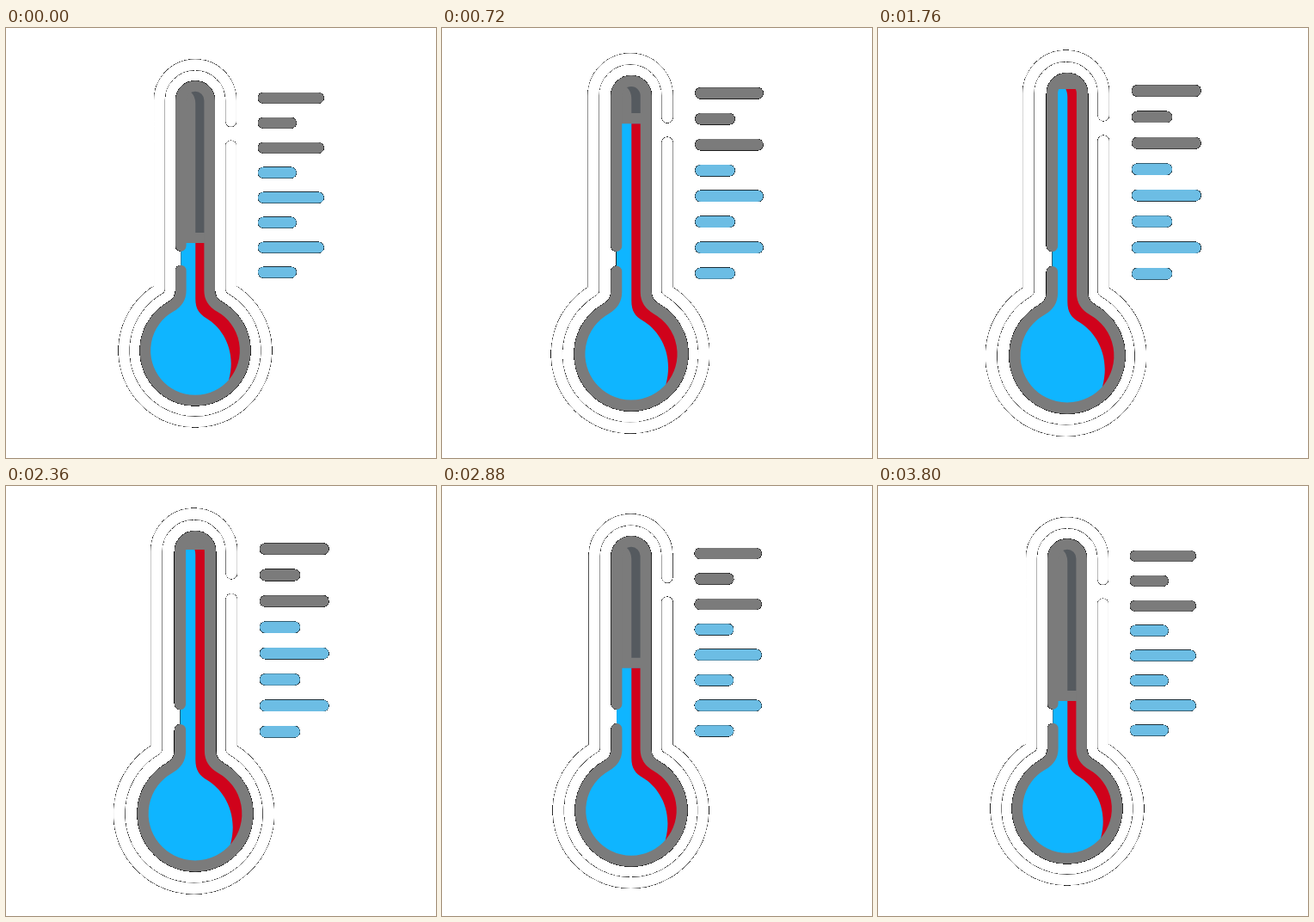
Write an HTML page with a canvas that moves like this. It is 500 px wide and 500 px high and loops after 3880 ms.

```html
<!DOCTYPE html>
<html>
<head>
<meta charset="utf-8">
<style>
  html, body { margin: 0; width: 100%; height: 100%; overflow: hidden; background: #fff; }
  canvas { display: block; width: 500px; height: 500px; }
</style>
</head>
<body>
<canvas id="stage" width="500" height="500"></canvas>
<script>
const ctx = document.getElementById('stage').getContext('2d', { willReadFrequently: true });
const GRAY = '#7b7b7b', SKY = '#6cbde4', BLUE = '#0fb5ff', RED = '#d0021b', SLOT = '#555a5f';
const LOOP = 3880, STEP = 40;
const RISE_END = 1760, FALL_START = 2260, FALL_END = 3800;

const halo = new Path2D('M262.2 131.5V306A87 87 0 1 1 174.82 306V76A43.69 43.69 0 0 1 262.2 76V101.5');
const body = new Path2D('M202.5 283.5V308Q202.5 321 190 328A61 61 0 1 0 250 328' +
  'Q237.5 321 237.5 308V76A17.5 17.5 0 0 0 202.5 76V253.5');
const shade = new Path2D('M215 66.5C218 69 220.3 74 220.3 80V318C220.3 331 225 336.5 234 342' +
  'C252 352.5 271 380 261 417L300 430V50H215Z');

// Cubic bezier (x1, 0, x2, 1)
function ease(t, x1, x2) {
  let lo = 0, hi = 1;
  for (let i = 0; i < 24; i++) {
    const s = (lo + hi) / 2, r = 1 - s;
    if (3 * r * r * s * x1 + 3 * r * s * s * x2 + s * s * s < t) lo = s; else hi = s;
  }
  return lo * lo * (3 - 2 * lo);
}

function progress(time, x1, x2) {
  if (time < RISE_END) return ease(time / RISE_END, x1, x2);
  const t = (time - FALL_START) / (FALL_END - FALL_START);
  return 1 - ease(Math.min(1, Math.max(0, t)), x1, x2);
}

function scaled(scale, cx, draw) {
  ctx.save();
  ctx.translate(cx, 250);
  ctx.scale(scale, scale);
  ctx.translate(-cx, -250);
  draw();
  ctx.restore();
}

function stroke(path, color, width) {
  ctx.strokeStyle = color;
  ctx.lineWidth = width;
  ctx.stroke(path);
}

function fillBand(path, color, top, bottom) {
  if (bottom <= top) return;
  ctx.save();
  ctx.beginPath();
  ctx.rect(0, top, 500, bottom - top);
  ctx.clip();
  ctx.fillStyle = color;
  ctx.fill(path);
  ctx.restore();
}

function drawScale() {
  for (let i = 0; i < 8; i++) {
    ctx.fillStyle = i < 3 ? GRAY : SKY;
    ctx.beginPath();
    ctx.roundRect(295.1, 66.3 + i * 30.4, i % 2 ? 46.9 : 80.4, 13.4, 6.7);
    ctx.fill();
  }
}

function drawTube(level) {
  ctx.fillStyle = GRAY;
  ctx.fill(body);
  ctx.save();
  ctx.clip(body);
  fillBand(shade, SLOT, 0, level - 12.5);
  fillBand(body, BLUE, level, 500);
  fillBand(shade, RED, level, 500);
  ctx.restore();
  stroke(body, GRAY, 13.2);
}

// Partly covered edge pixels blend with black, bare pixels stay white
function darkenEdges() {
  const image = ctx.getImageData(0, 0, 500, 500), px = image.data;
  for (let i = 0; i < px.length; i += 4) {
    const alpha = px[i + 3];
    if (alpha < 20) px.fill(255, i, i + 3);
    else for (let c = i; c < i + 3; c++) px[c] *= alpha / 255;
    px[i + 3] = 255;
  }
  ctx.putImageData(image, 0, 0);
}

function render(time) {
  const scale = 0.953 + 0.047 * progress(time, 0.33, 0.2);
  const level = 250 - 179 * progress(time, 0.335, 0);
  ctx.clearRect(0, 0, 500, 500);
  ctx.lineCap = ctx.lineJoin = 'round';
  scaled(scale, 250, () => {
    stroke(halo, '#fff', 13.3);
    drawScale();
  });
  scaled(scale, 220, () => drawTube(level));
  darkenEdges();
}

let shown = -1;
function tick() {
  const time = Math.floor((performance.now() % LOOP) / STEP) * STEP;
  if (time !== shown) render(shown = time);
  requestAnimationFrame(tick);
}
tick();
</script>
</body>
</html>
```
